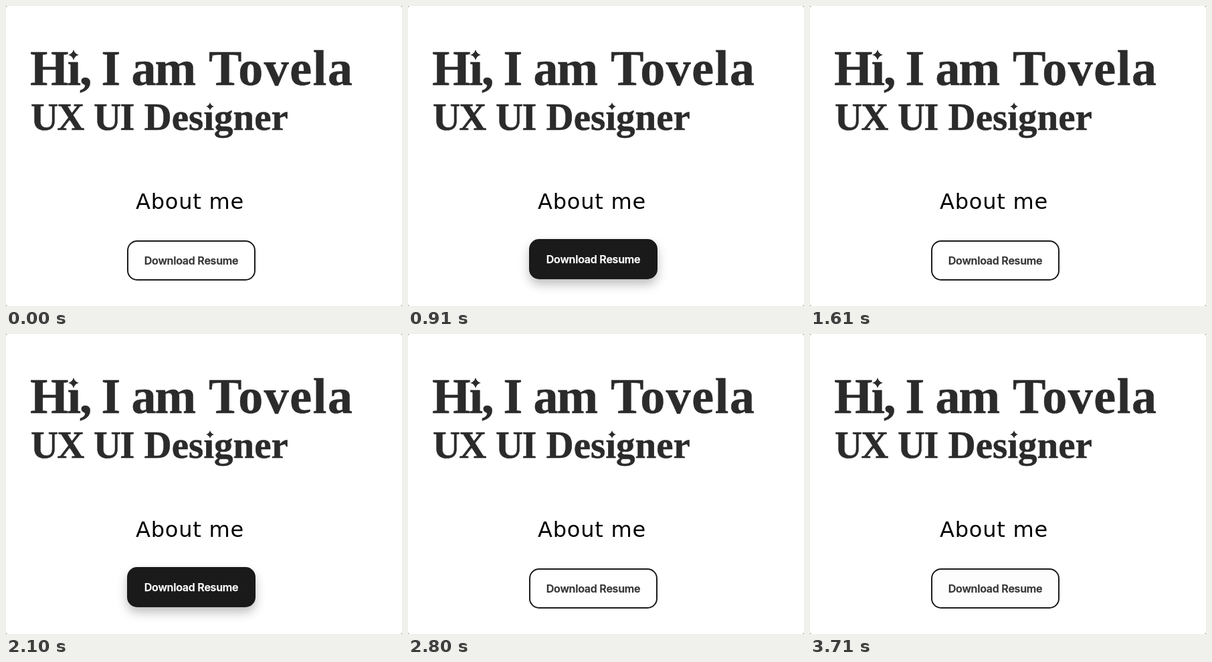
Write an HTML page that moves like this. It is 592 px wide and 448 px high and loops after 4060 ms.

```html
<!DOCTYPE html>
<html lang="en">
<head>
<meta charset="utf-8">
<title>Portfolio intro</title>
<style>
  html, body { margin: 0; width: 100%; height: 100%; overflow: hidden; background: #858585; }
  #stage { position: absolute; left: 0; top: 0; width: 592px; height: 448px; border-radius: 3px; background: #fff; overflow: hidden; }
  svg { position: absolute; left: 0; top: 0; }
  .title { font-family: "Liberation Serif", "Times New Roman", serif; font-weight: 700; fill: #2b2b2b; stroke: #2b2b2b; stroke-width: .5; }
  .big { font-size: 74px; }
  .mid { font-size: 57px; }
  .tight { letter-spacing: -2px; }
  .loose { letter-spacing: 1.6px; }
  .about { font: 400 32px "DejaVu Sans", sans-serif; letter-spacing: .8px; fill: #000; }
  #button {
    position: absolute; left: 181px; top: 350px; width: 192px; height: 60px;
    box-sizing: border-box; border: 2px solid #1a1a1a; border-radius: 15px;
    display: flex; align-items: center; justify-content: center; white-space: nowrap;
    font: 600 16px Inter, sans-serif; letter-spacing: -.22px; -webkit-text-stroke: .25px;
  }
</style>
</head>
<body>
<div id="stage">
  <svg width="592" height="448" viewBox="0 0 592 448">
    <defs>
      <path id="star" d="M0-8Q1.6-1.6 8 0Q1.6 1.6 0 8Q-1.6 1.6-8 0Q-1.6-1.6 0-8Z"/>
    </defs>
    <g class="title big">
      <text class="tight" x="36" y="117.5">Hı,</text>
      <text x="142.5" y="117.5">I</text>
      <text class="tight" x="187.5" y="117.5">am</text>
      <text class="loose" x="303" y="117.5">Tovela</text>
    </g>
    <g class="title mid">
      <text class="tight" x="37" y="185">UX</text>
      <text class="tight" x="131" y="185">UI</text>
      <text x="206.5" y="185">Desıgner</text>
    </g>
    <g fill="#2b2b2b">
      <use href="#star" transform="translate(101 73)"/>
      <use href="#star" transform="translate(305 150) scale(.76)"/>
    </g>
    <text class="about" x="194" y="302.5">About me</text>
  </svg>
  <div id="button">Download Resume</div>
</div>
<script>
const LOOP = 4060, STEP = 70, FADE = 300;
const toggles = [610, 1350, 1840, 2540, 3100, 3510]; // hover on, off, on, ...
const button = document.getElementById("button");

const bezier = (a, b, u) => 3 * a * u * (1 - u) ** 2 + 3 * b * u * u * (1 - u) + u ** 3;

// cubic-bezier(.23, 1, .32, 1)
function ease(x) {
  if (x <= 0) return 0;
  if (x >= 1) return 1;
  let lo = 0, hi = 1;
  for (let i = 0; i < 24; i++) {
    const mid = (lo + hi) / 2;
    if (bezier(.23, .32, mid) < x) lo = mid; else hi = mid;
  }
  return bezier(1, 1, lo);
}

function hoverAt(t) {
  let hover = 0;
  toggles.forEach((start, i) => {
    if (t < start) return;
    const p = ease((t - start) / FADE);
    hover = i % 2 ? 1 - p : p;
  });
  return hover;
}

function draw(time) {
  const t = Math.floor((time % LOOP) / STEP) * STEP;
  const h = hoverAt(t);
  const ink = Math.round(52 + 203 * h);
  const s = button.style;
  s.transform = `translateY(${-2 * h}px)`;
  s.color = `rgb(${ink},${ink},${ink})`;
  s.backgroundColor = `rgba(26,26,26,${h})`;
  s.boxShadow = `0 ${8 * h}px ${15 * h}px rgba(0,0,0,${.25 * h})`;
}

const begin = performance.now();
function tick() {
  draw(performance.now() - begin);
  requestAnimationFrame(tick);
}
draw(0);
requestAnimationFrame(tick);
</script>
</body>
</html>
```
